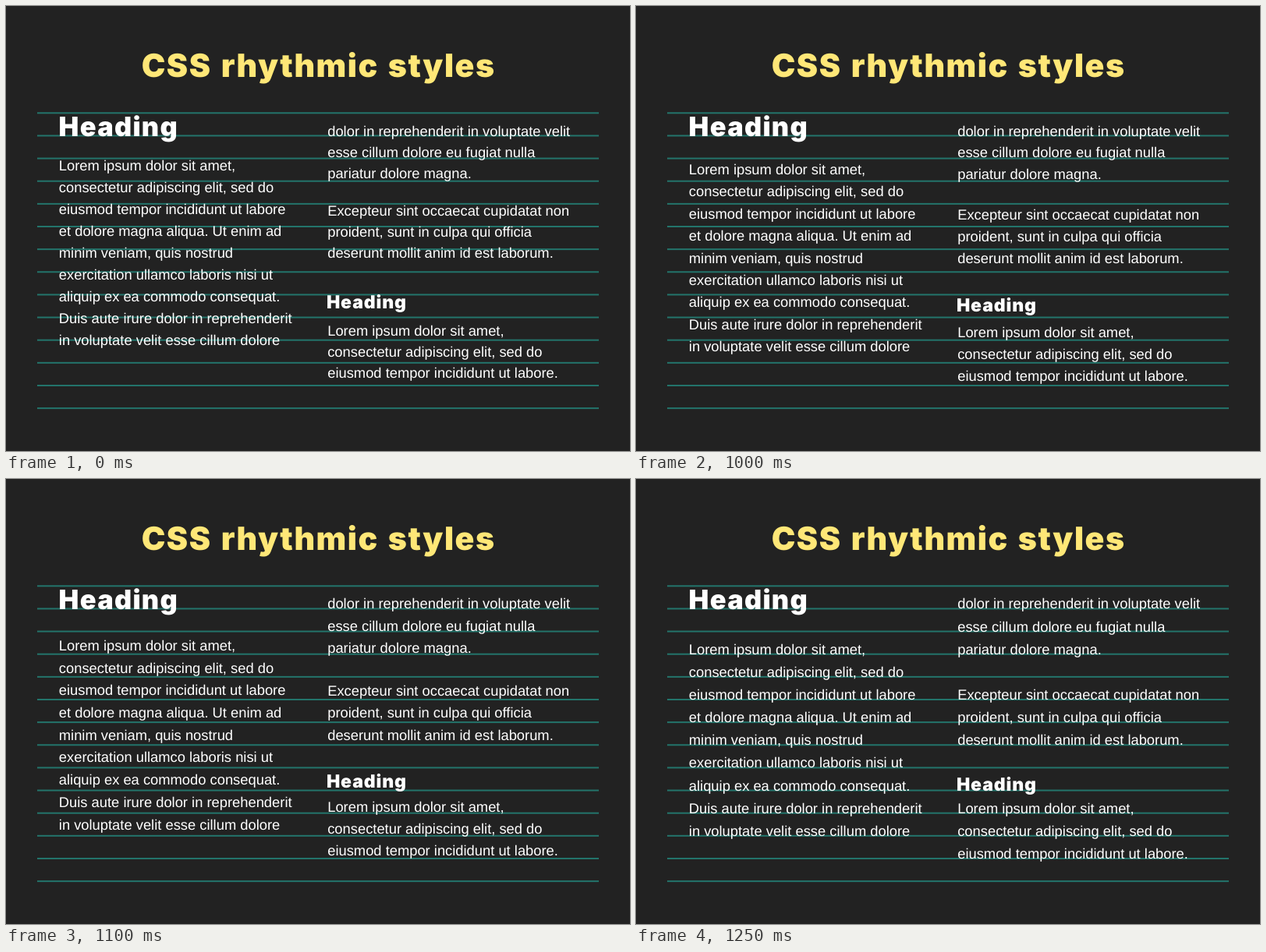
Write an HTML page with a canvas that moves like this. It is 800 px wide and 571 px high and loops after 3 s.

```html
<!DOCTYPE html>
<html lang="en">
<head>
<meta charset="utf-8">
<title>CSS rhythmic styles</title>
<style>
  html, body { margin: 0; width: 100%; height: 100%; overflow: hidden; background: #222; }
  canvas { display: block; width: 800px; height: 571px; }
</style>
</head>
<body>
<canvas id="stage"></canvas>
<script>
const W = 800, H = 571, LOOP = 3000;
const GRID_TOP = 137.3, GAP = 29.14;
const canvas = document.getElementById('stage');
const ctx = canvas.getContext('2d');
const ratio = window.devicePixelRatio || 1;
canvas.width = Math.round(W * ratio);
canvas.height = Math.round(H * ratio);

// Progress reached on each 50 ms tick from START on
const START = 900, TICK = 50;
const STEPS = [0.12, 0.25, 0.375, 0.51, 0.65, 0.89, 0.96, 1];

// x, first baseline and line height before; grid row of the first baseline after
const BLOCKS = [
  { x: 67.8, y: 210.6, lead: 28, row: 3, lines: [
    'Lorem ipsum dolor sit amet,',
    'consectetur adipiscing elit, sed do',
    'eiusmod tempor incididunt ut labore',
    'et dolore magna aliqua. Ut enim ad',
    'minim veniam, quis nostrud',
    'exercitation ullamco laboris nisi ut',
    'aliquip ex ea commodo consequat.',
    'Duis aute irure dolor in reprehenderit',
    'in voluptate velit esse cillum dolore' ] },
  { x: 412.2, y: 166.6, lead: 27, row: 1, lines: [
    'dolor in reprehenderit in voluptate velit',
    'esse cillum dolore eu fugiat nulla',
    'pariatur dolore magna.' ] },
  { x: 412.2, y: 268.5, lead: 27, row: 5, lines: [
    'Excepteur sint occaecat cupidatat non',
    'proident, sunt in culpa qui officia',
    'deserunt mollit anim id est laborum.' ] },
  { x: 412.2, y: 422.7, lead: 27, row: 10, lines: [
    'Lorem ipsum dolor sit amet,',
    'consectetur adipiscing elit, sed do',
    'eiusmod tempor incididunt ut labore.' ] }
];

const mix = (a, b, p) => a + (b - a) * p;
const rowY = n => GRID_TOP + n * GAP;

function progress(t) {
  if (t < START) return 0;
  return STEPS[Math.min(STEPS.length - 1, Math.floor((t - START) / TICK))];
}

function setFont(font, letter, word) {
  ctx.font = font;
  ctx.letterSpacing = `${letter}px`;
  ctx.wordSpacing = `${word}px`;
}

function heading(text, x, y, size, color) {
  setFont(`900 ${size}px Inter, sans-serif`, size * 0.037, size * 0.06);
  ctx.fillStyle = color;
  ctx.fillText(text, x, y);
}

function draw(t) {
  const p = progress(t);
  ctx.setTransform(ratio, 0, 0, ratio, 0, 0);
  ctx.textRendering = 'geometricPrecision';
  ctx.fillStyle = '#222';
  ctx.fillRect(0, 0, W, H);

  ctx.fillStyle = '#23746b';
  for (let i = 0; i < 14; i++) ctx.fillRect(40, rowY(i) - 1, 720, 2);

  heading('CSS rhythmic styles', 173.7, 90.5, 41, '#ffe777');
  heading('Heading', 67.6, 166.6, 34.4, '#fff');
  heading('Heading', 410.9, mix(387.5, 400.2, p), 23.1, '#fff');

  setFont('18.35px "Liberation Sans", Arial, sans-serif', 0, 0);
  ctx.fillStyle = '#fff';
  for (const b of BLOCKS) {
    b.lines.forEach((line, i) => {
      ctx.fillText(line, b.x, mix(b.y + i * b.lead, rowY(b.row + i), p));
    });
  }
}

const origin = performance.now();
function frame() {
  draw((performance.now() - origin) % LOOP);
  requestAnimationFrame(frame);
}
frame();
</script>
</body>
</html>
```
